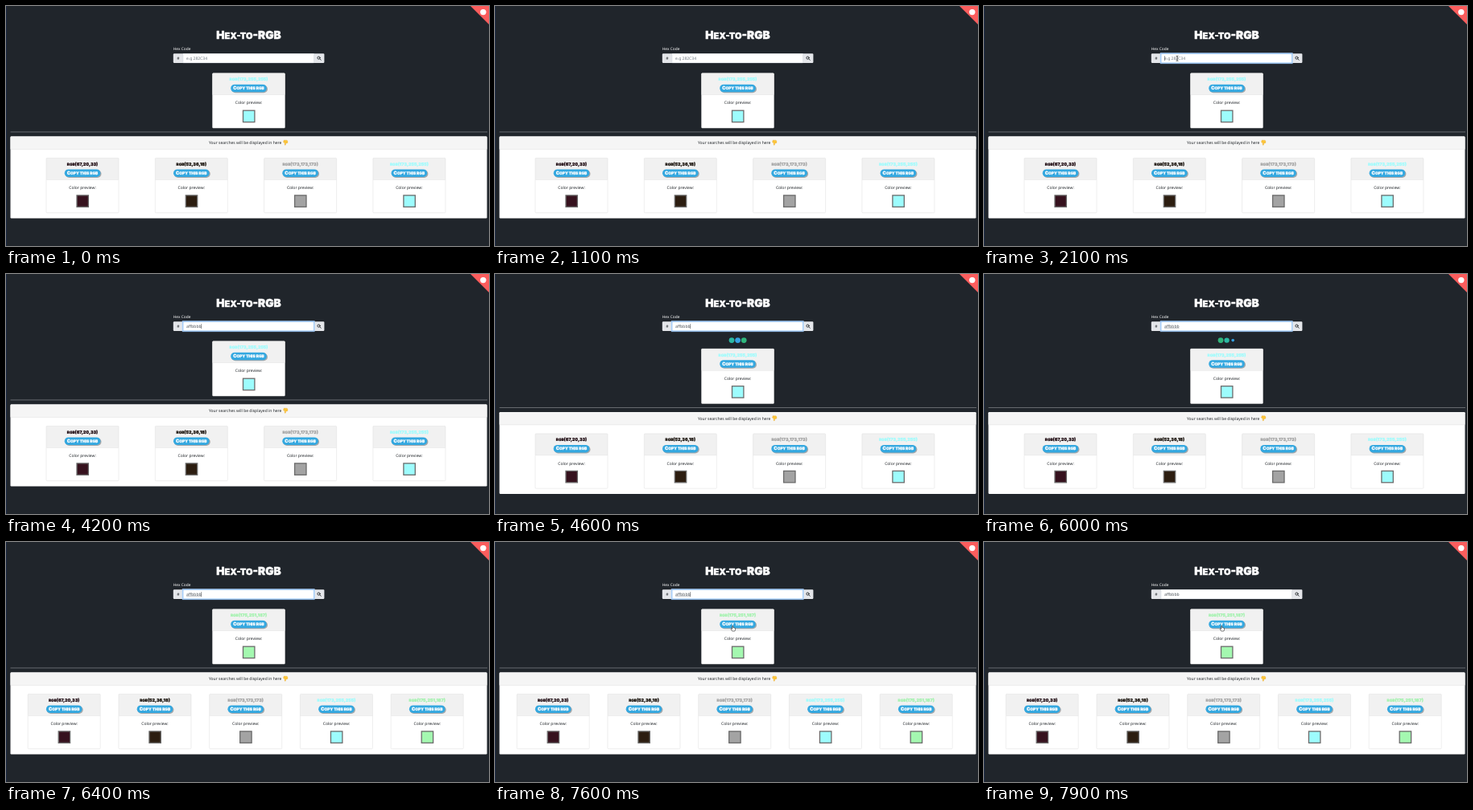
These frames come from a looping animation (600 px wide and 299 px high, 8 s). An HTML page:

```html
<!DOCTYPE html>
<html lang="en">
<head>
<meta charset="utf-8">
<title>Hex-to-RGB</title>
<style>
  html, body { margin: 0; width: 100%; height: 100%; overflow: hidden; background: #20252b; }
  svg { display: block; width: 100vw; height: 100vh; }
  text { font: 5px "Noto Sans", "Open Sans", sans-serif; fill: #212529; text-rendering: geometricPrecision; white-space: pre; }
  .mid { text-anchor: middle; }
  .heavy { font-family: Inter, Roboto, sans-serif; font-weight: 900; text-anchor: middle; stroke-linejoin: round; }
</style>
</head>
<body>
<svg id="stage" viewBox="0 0 600 299"></svg>
<script>
const LOOP = 8000;
const FOCUS = 1950, LOADING = 4600, LOADED = 6200, BLUR = 7750;
const SHIFT = 9.5;
const KEYS = [[2600, 'a'], [3000, 'f'], [3200, 'f'], [3700, 'b'], [3900, 'b'], [4000, 'b'], [4200, 'b']];
const LAST_KEY = 4200;
const DOT_COLORS = ['#2cb9a4', '#36a2e2', '#30b67c'];
// label, swatch, label colour
const COLORS = [
  ['rgb(67,20,33)', '#36121e', '#1c080f'],
  ['rgb(52,36,18)', '#2c1d10', '#140d07'],
  ['rgb(173,173,173)', '#a3a3a3', '#a3a3a3'],
  ['rgb(173,255,255)', '#9dfcfd', '#9dfcfd'],
  ['rgb(175,251,187)', '#a4f8b0', '#a0f2ac']
];

const stage = document.getElementById('stage');

function add(parent, tag, attrs = {}, text) {
  const el = document.createElementNS('http://www.w3.org/2000/svg', tag);
  set(el, attrs);
  if (text !== undefined) el.textContent = text;
  parent.appendChild(el);
  return el;
}
function set(el, attrs) {
  for (const k in attrs) el.setAttribute(k, attrs[k]);
}
const rect = (p, x, y, width, height, fill, more) => add(p, 'rect', { x, y, width, height, fill, ...more });
const show = (el, on) => el.setAttribute('visibility', on ? 'visible' : 'hidden');
const move = (el, x, y) => el.setAttribute('transform', `translate(${x.toFixed(2)} ${y.toFixed(2)})`);
const clamp = v => Math.max(0, Math.min(1, v));
const smooth = v => { v = clamp(v); return v * v * (3 - 2 * v); };
const lerp = (a, b, k) => a + (b - a) * k;

// Small-caps display lettering
function heavy(parent, str, x, y, big, small, fill, weight) {
  const el = add(parent, 'text', { x, y, class: 'heavy', style: `fill:${fill}`, stroke: fill, 'stroke-width': weight });
  for (const run of str.match(/[a-z ]+|[^a-z ]+/g)) {
    add(el, 'tspan', { style: `font-size:${run === '-' || /[a-z ]/.test(run) ? small : big}px` }, run.toUpperCase());
  }
  return el;
}

function card(parent, [label, swatch, ink]) {
  const g = add(parent, 'g');
  rect(g, -45, 0, 90, 68.3, '#fff', { rx: 1 });
  rect(g, -45, 0, 90, 27, '#f1f1f1', { rx: 1 });
  rect(g, -45, 0, 90, 68.3, 'none', { rx: 1, stroke: '#dcdcdc', 'stroke-width': .5 });
  rect(g, -45, 26.8, 90, .4, '#dedede');
  heavy(g, label, 0, 9.6, 5.4, 4.7, ink, .2);
  rect(g, -21.5, 14.8, 45, 9.8, '#8c9094', { rx: 4.9, opacity: .75 });
  rect(g, -22.3, 14, 44.6, 9.6, '#34a8e0', { rx: 4.8 });
  heavy(g, 'Copy this rgb', 0, 20.6, 5.8, 4.83, '#fff', .25);
  add(g, 'text', { x: 0, y: 38.8, class: 'mid' }, 'Color preview:');
  rect(g, -7, 46.5, 14.4, 14.4, swatch, { stroke: '#6b6b6b', 'stroke-width': 1.3 });
  return g;
}

// Page frame
rect(stage, 0, 0, 600, 299, '#20252b');
rect(stage, 0, 0, 1, 299, '#1a2742');
add(stage, 'path', { d: 'M577 0H600V23Z', fill: '#fb5d5d' });
add(stage, 'circle', { cx: 592.8, cy: 7.6, r: 3.7, fill: '#fff' });
heavy(stage, 'Hex-to-RGB', 301.5, 41, 13.7, 11, '#fff', .4);

// Search field
add(stage, 'text', { x: 207.8, y: 54.8, style: 'fill:#fff;font-size:4.8px' }, 'Hex Code');
rect(stage, 207.8, 59.2, 187.6, 11.8, '#e4e6ea', { rx: 1.2 });
add(stage, 'text', { x: 213.8, y: 67, class: 'mid' }, '#');
const field = rect(stage, 220, 59.3, 162.4, 11.6, '#fff');
const ring = add(stage, 'g');
rect(ring, 219.4, 58.7, 163.6, 12.8, 'none', { stroke: '#a9d2ff', 'stroke-width': 1.2, opacity: .8 });
rect(ring, 220, 59.3, 162.4, 11.6, 'none', { stroke: '#80bdff', 'stroke-width': .5 });
const lens = add(stage, 'g', { fill: 'none', stroke: '#212529', 'stroke-width': .9, 'stroke-linecap': 'round' });
add(lens, 'circle', { cx: 388.5, cy: 64.6, r: 1.6 });
add(lens, 'path', { d: 'M389.8 65.9L391.2 67.3' });
const hint = add(stage, 'text', { x: 224, y: 67, style: 'fill:#6c757d' }, 'e.g 282C34');
const typed = add(stage, 'text', { x: 224, y: 67, style: 'fill:#495057' });
const underline = rect(stage, 224, 67.7, 17.5, .4, '#6a7077');
const caret = rect(stage, 224, 62.2, .5, 6, '#212529');

// Loader
const loader = add(stage, 'g');
const dots = [294, 301.6, 309.2].map(cx => add(loader, 'circle', { cx, cy: 82.6 }));

// Results
const body = add(stage, 'g');
const before = card(body, COLORS[3]);
const after = card(body, COLORS[4]);
move(before, 301.5, 83.7);
move(after, 301.5, 83.7);
rect(body, 5.5, 156.6, 592.5, .7, '#85888c');
rect(body, 5.5, 162.5, 592, 102, '#fff', { rx: 1.2 });
rect(body, 5.5, 162.5, 592, 16, '#f5f5f5', { rx: 1.2 });
rect(body, 5.5, 178.2, 592, .5, '#dedede');
add(body, 'text', { x: 252, y: 172.2 }, 'Your searches will be displayed in here');
add(body, 'path', {
  d: 'M345 167.2h3.6q1.3 .2 1.3 1.6v1.4q-.3 .9-1.2 .8h-1.2v2q-.7 .9-1.3 0v-2.2l-1.7-1.3q-.4-.9 .5-.8z',
  fill: '#fcc63a', stroke: '#e3a02b', 'stroke-width': .3
});
const list = COLORS.map(c => card(body, c));

// Pointers
const beam = add(stage, 'path', {
  d: 'M-1.4 -3.2Q0 -3.2 0 -2.4Q0 -3.2 1.4 -3.2M0 -2.4V2.4M-1.4 3.2Q0 3.2 0 2.4Q0 3.2 1.4 3.2',
  fill: 'none', stroke: '#222', 'stroke-width': .7
});
const arrow = add(stage, 'path', {
  d: 'M0 0V6.2L1.5 4.9L2.5 7L3.5 6.5L2.6 4.5H4.5Z', fill: '#111', stroke: '#fff', 'stroke-width': .5
});
const hand = add(stage, 'path', {
  d: 'M-.7 0Q0 -.8 .5 0V2.2Q1.2 1.7 1.6 2.4Q2.3 2 2.6 2.8Q3.3 2.6 3.3 3.4V4.6L2.6 6.4H-.6L-2.3 3.8Q-2 2.9 -.7 3.8Z',
  fill: '#fff', stroke: '#111', 'stroke-width': .55
});

function drawField(t) {
  const focus = clamp((t - FOCUS) / 150) * (1 - clamp((t - BLUR) / 150));
  const value = KEYS.filter(k => t >= k[0]).map(k => k[1]).join('');
  ring.setAttribute('opacity', focus);
  field.setAttribute('stroke', '#ced4da');
  field.setAttribute('stroke-width', .4);
  typed.textContent = value;
  show(hint, !value);
  const width = value ? typed.getComputedTextLength() : 0;
  caret.setAttribute('x', 224 + width);
  const lit = t < LAST_KEY || Math.floor((t - LAST_KEY) / 500) % 2 === 0;
  show(caret, t >= FOCUS && t < BLUR && lit);
  underline.setAttribute('width', width);
  show(underline, t >= 5500 && t < BLUR);
}

function pulse(ms) {
  if (ms < 0) return 1;
  const p = ms % 750 / 750;
  if (p < .45) return lerp(1, .1, 1 - (1 - p / .45) ** 2);
  return lerp(.1, 1, 1 - (1 - clamp((p - .45) / .35)) ** 2);
}

function drawResults(t) {
  const loading = t >= LOADING && t < LOADED;
  const done = t >= LOADED;
  show(loader, loading);
  const turn = Math.max(0, Math.floor((t - LOADING) / 750));
  dots.forEach((dot, i) => set(dot, {
    r: 3.4 * pulse(t - LOADING - 120 * i),
    fill: DOT_COLORS[(i + 2 * turn) % 3]
  }));
  move(body, 0, loading ? SHIFT : 0);
  show(before, !done);
  show(after, done);
  const step = done ? 112.75 : 135.3;
  const first = done ? 72.2 : 95;
  list.forEach((g, i) => {
    move(g, first + step * i, 189.4);
    show(g, i < 4 || done);
  });
}

function drawPointer(t) {
  let x, y, shape = null;
  if (t >= 1300 && t < 2600) {
    const k = smooth((t - 1300) / 400);
    x = lerp(330, 240, k);
    y = lerp(72, 65.3, k);
    shape = y < 71 ? beam : arrow;
  } else if (t >= 6700) {
    const k = smooth((t - 6700) / 700);
    x = lerp(240, 295.3, k);
    y = lerp(65.3, 104.6, k);
    shape = y < 71 ? beam : y > 98 ? hand : arrow;
  }
  for (const p of [beam, arrow, hand]) show(p, p === shape);
  if (shape) move(shape, x, y);
}

function render(t) {
  drawField(t);
  drawResults(t);
  drawPointer(t);
}

const start = performance.now();
function tick() {
  render((performance.now() - start) % LOOP);
  requestAnimationFrame(tick);
}
render(0);
requestAnimationFrame(tick);
</script>
</body>
</html>
```
